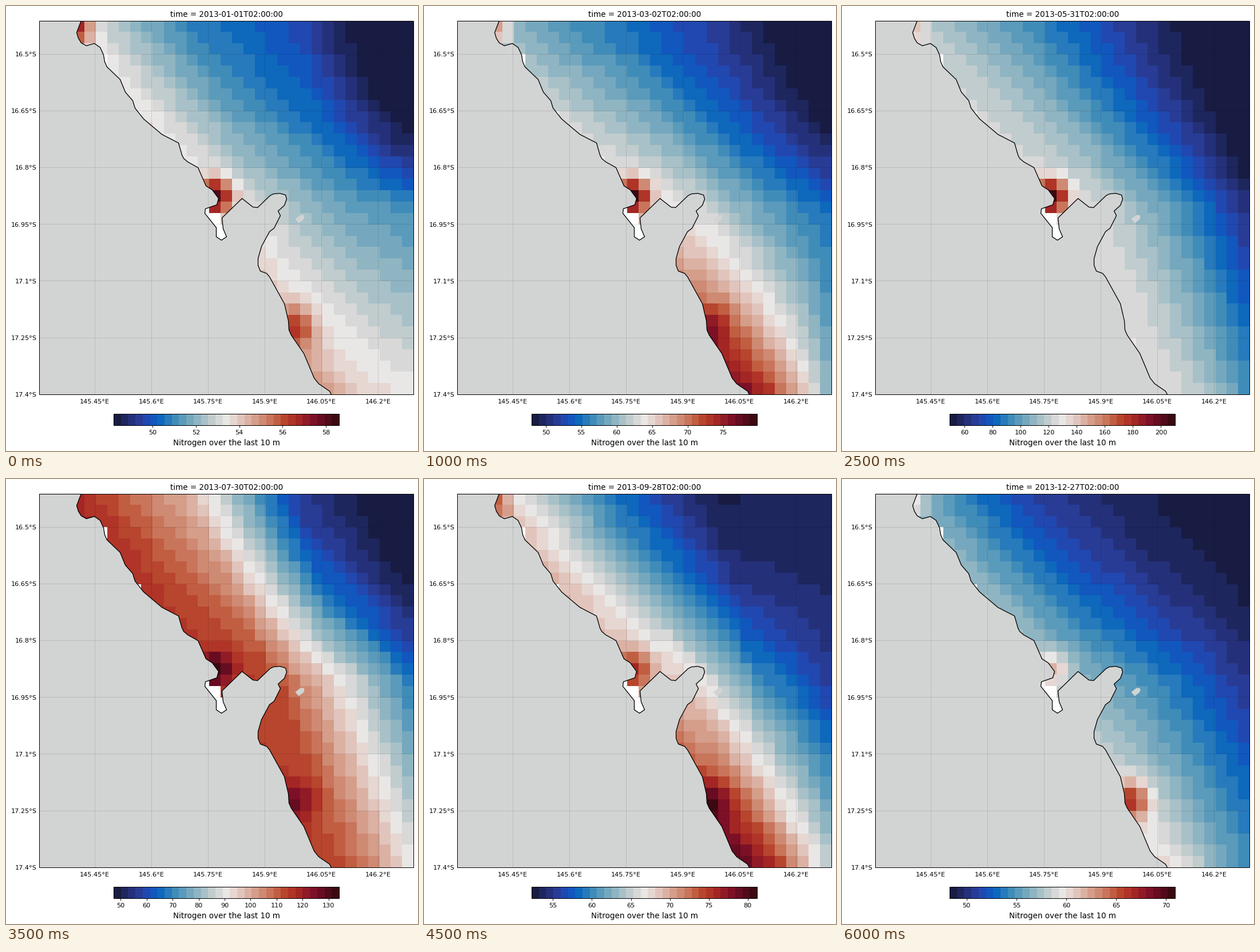
A matplotlib script for the animation above (6500 ms loop, 720 px wide and 778 px high).

```python
import numpy as np
import matplotlib.pyplot as plt
from matplotlib.animation import FuncAnimation
from matplotlib.colors import LinearSegmentedColormap

W, H, DPI = 720, 778, 100
LEFT, RIGHT, TOP, BOTTOM = 58.4, 712.4, 25.6, 679
CELLS, LEVELS, STEPS = 33, 31, 13
LAND = "#d2d4d3"
PX = 72 / DPI  # points per pixel
plt.rcParams["font.family"] = "DejaVu Sans"

STOPS = [
    (0, "#181c43"), (.091, "#293a8f"), (.125, "#2645ad"), (.167, "#1158bf"),
    (.195, "#0b66bd"), (.273, "#4590b9"), (.364, "#8eb5c2"),
    (.455, "#d2d4d3"), (.5, "#e9e7e6"), (.545, "#e6d2cc"),
    (.636, "#d59d89"), (.727, "#c46548"), (.75, "#bc4e32"),
    (.818, "#ac2b24"), (.909, "#780e28"), (1, "#3c0911"),
]
CMAP = LinearSegmentedColormap.from_list("diverging", STOPS, N=LEVELS)

# Per key step: scale limits, then percent of scale from coast to open sea
# in the north, middle and south, then the strength of the three plumes.
SEASON = np.array([
    [0, 48.2, 58.6, 50, 26, 15, -12, 54, 44, 33, 28, 62, 55, 52, 50, 33, 46, 22],
    [2, 48.0, 79.8, 38, 25, 11, -6, 54, 48, 33, 22, 88, 76, 58, 38, 25, 46, 14],
    [5, 49.2, 210, 44, 29, 10, -8, 50, 45, 30, 9, 48, 44, 37, 29, 12, 50, 0],
    [7, 47.3, 134, 81, 60, 12, -4, 79, 77, 51, 25, 77, 71, 62, 51, 0, 21, 14],
    [8, 54.8, 97.4, 56, 28, 4, 6, 60, 53, 24, 8, 97, 80, 56, 34, 5, 17, 18],
    [10, 49.7, 65, 58, 22, 2, 2, 63, 55, 33, 16, 88, 79, 66, 54, 25, 32, 16],
    [12, 48.3, 70.9, 36, 14, 4, 0, 42, 34, 23, 10, 52, 45, 36, 29, 14, 22, 33],
])
PLUMES = [(3, .3, 1.2), (15, 15, 1.5), (22, 26.6, 1.8)]  # column, row, radius
EMPTY = [(5, 3), (8, 8), (14, 16), (14, 17), (15, 17)]

COAST = [
    (131, 25), (123, 46), (126, 56), (131, 64), (140, 69), (154, 65),
    (164, 72), (170, 85), (172, 97), (176, 106), (199, 128), (208, 150),
    (221, 165), (225, 178), (240, 197), (272, 224), (301, 239), (307, 260),
    (310, 266), (317, 272), (335, 282), (349, 314), (360, 321), (371, 336),
    (368, 347), (348, 354), (347, 362), (367, 387), (367, 403), (376, 409),
    (385, 403), (379, 389), (377, 370), (412, 336), (431, 351), (439, 352),
    (461, 331), (467, 328), (478, 327), (488, 330), (490, 337), (486, 348),
    (475, 358), (479, 366), (468, 388), (460, 394), (446, 420), (440, 441),
    (440, 453), (444, 463), (455, 467), (460, 473), (486, 520), (493, 550),
    (494, 566), (498, 575), (520, 607), (538, 650), (546, 660), (565, 673),
    (568, 679),
]
ISLAND = [(505, 372), (514, 365), (520, 365), (521, 369), (519, 373),
          (511, 379)]

rows, cols = np.mgrid[:CELLS, :CELLS]
shore = 3 + 22 / 32 * rows
offshore = np.clip((cols - shore) / (CELLS - 1 - shore), 0, 1)


def state(step):
    """Scale limits, three transects and plume strengths at one step."""
    v = np.array([np.interp(step, SEASON[:, 0], c) for c in SEASON.T[1:]])
    return v[:2], v[2:14].reshape(3, 4), v[14:]


def field(transects, strengths):
    """Blend the transects from north to south and add the river plumes."""
    knots = np.linspace(0, 1, 4)
    north, middle, south = (np.interp(offshore, knots, t) for t in transects)
    t = rows / (CELLS // 2)
    # Northern water reaches further south the further offshore it lies.
    upper = north + (middle - north) * np.minimum(t, 1) ** (1 + offshore)
    grid = upper + (south - middle) * np.clip(t - 1, 0, 1)
    for (col, row, radius), strength in zip(PLUMES, strengths):
        dist = np.hypot(cols - col, rows - row)
        grid = grid + strength * np.exp(-(dist / radius) ** 2)
    for col, row in EMPTY:
        grid[row, col] = np.nan
    grid[18:20, 14:17] = np.nan
    return np.ma.masked_invalid(np.clip(grid, 0, 100))


fig = plt.figure(figsize=(W / DPI, H / DPI), dpi=DPI, facecolor="white")
ax = fig.add_axes([0, 0, 1, 1])
sea = ax.imshow(offshore, cmap=CMAP, vmin=0, vmax=100, aspect="auto",
                interpolation="nearest", extent=(LEFT, RIGHT, BOTTOM, TOP))
ax.set(xlim=(0, W), ylim=(H, 0))
ax.axis("off")

coast = np.array(COAST) + .5
land = np.vstack([coast, [(LEFT, BOTTOM), (LEFT, TOP)]])
edge = ax.plot(*coast.T, color="black", lw=1.3 * PX)[0]
for shape in (land, np.array(ISLAND) + .5):
    ax.fill(*shape.T, color=LAND, lw=0)
frame = plt.Rectangle((LEFT, TOP), RIGHT - LEFT, BOTTOM - TOP, fill=False,
                      lw=PX, zorder=4)
ax.add_patch(frame)
for artist in (sea, edge):
    artist.set_clip_path(frame)


def label(x, y, text, size, **kw):
    return ax.text(x, y, text, fontsize=size * PX, va="baseline", **kw)


grid_style = dict(color="black", alpha=.13, lw=.9 * PX)
for i in range(6):
    x = 155 + 99 * i
    ax.plot([x, x], [TOP, BOTTOM], **grid_style)
    label(x + .2, 695, f"{145.45 + .15 * i:.5g}°E", 11.3, ha="center")
for i in range(7):
    y = 84 + 99.1 * i
    ax.plot([LEFT, RIGHT], [y, y], **grid_style)
    label(54, y + 4.2, f"{16.5 + .15 * i:.4g}°S", 11.3, ha="right")

title = label(385.3, 19, "", 13.5, ha="center")
label(385.3, 768, "Nitrogen over the last 10 m", 13.5, ha="center")

bar_ax = fig.add_axes([188 / W, 1 - 732.6 / H, 394 / W, 20 / H])
bar = bar_ax.imshow([np.arange(LEVELS)], cmap=CMAP, aspect="auto",
                    interpolation="nearest")
bar_ax.set_yticks([])
bar_ax.tick_params(labelsize=11.3 * PX, length=3.9 * PX, width=.9 * PX,
                   pad=4.2 * PX)
for spine in bar_ax.spines.values():
    spine.set_linewidth(PX)


def draw(step):
    (low, high), transects, strengths = state(step)
    sea.set_data(field(transects, strengths))
    day = np.datetime64("2013-01-01") + 30 * step
    title.set_text(f"time = {day}T02:00:00")

    gap = next(g for g in (1, 2, 5, 10, 20, 50) if (high - low) / g <= 9)
    ticks = np.arange(np.ceil(low / gap) * gap, high, gap)
    bar.set_extent((low, high, 0, 1))
    bar_ax.set_xlim(low, high)
    bar_ax.set_xticks(ticks, [f"{v:.0f}" for v in ticks])
    return sea, title, bar


anim = FuncAnimation(fig, draw, frames=STEPS, interval=500, repeat=True,
                     repeat_delay=0, blit=False)
plt.show()
```
